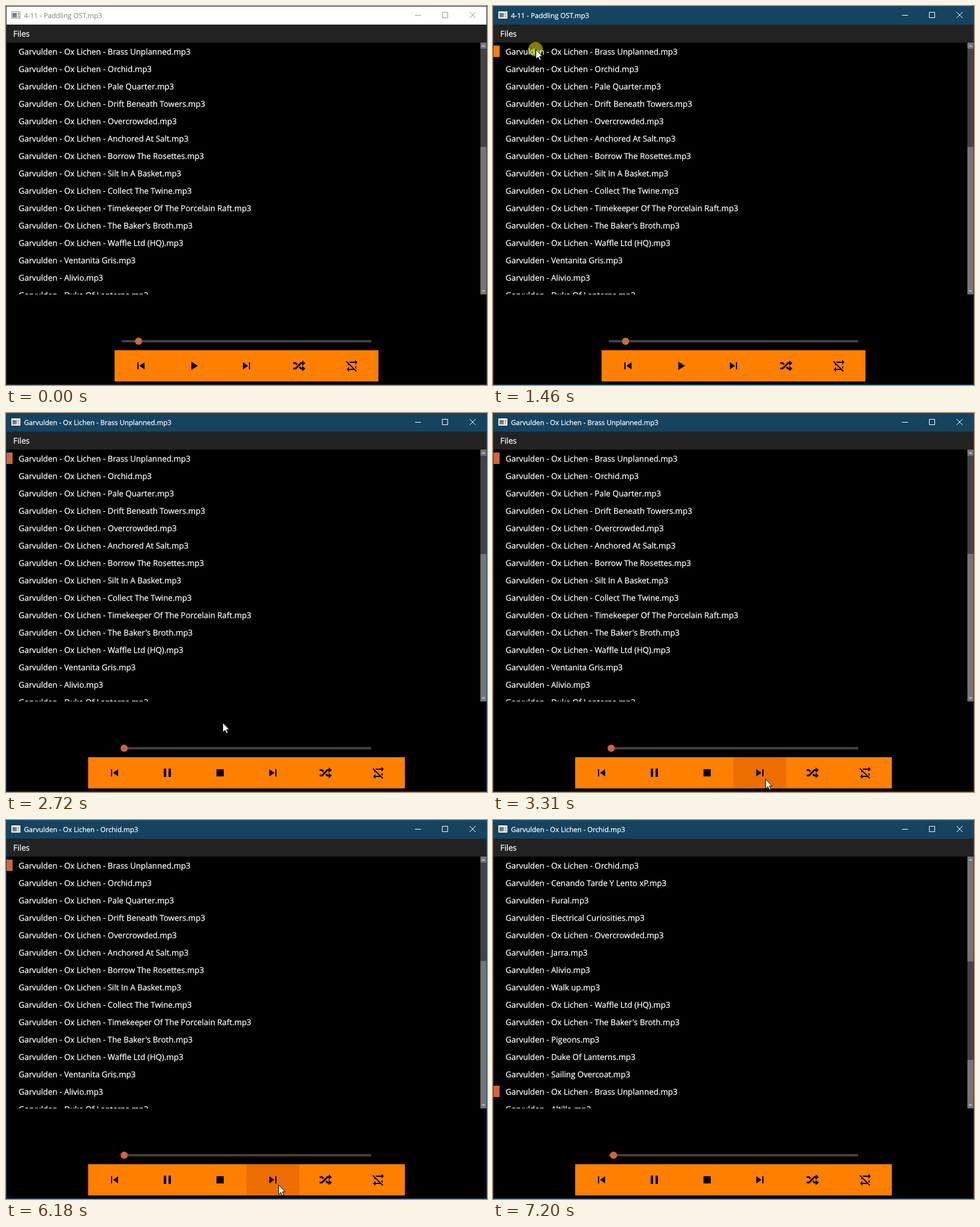
Animation, 802 px wide and 632 px high, one loop 8 s. Source, as an HTML page with a canvas:

```html
<!DOCTYPE html>
<html lang="en">
<head>
<meta charset="utf-8">
<title>Music player</title>
<style>
html, body { margin: 0; width: 100%; height: 100%; overflow: hidden; background: #000; }
canvas { display: block; }
</style>
</head>
<body>
<canvas id="stage" width="802" height="632"></canvas>
<script>
const ctx = document.getElementById('stage').getContext('2d');
const LOOP = 8000, STEP = 47;
const ORANGE = '#ff7f00', SALMON = '#d0653f';
const ARTIST = 'Garvulden - ', COVER = ARTIST + 'Ox Lichen - ';

const covers = ['Brass Unplanned', 'Orchid', 'Pale Quarter', 'Drift Beneath Towers', 'Overcrowded',
  'Anchored At Salt', 'Borrow The Rosettes', 'Silt In A Basket', 'Collect The Twine',
  'Timekeeper Of The Porcelain Raft', "The Baker's Broth", 'Waffle Ltd (HQ)'].map(s => COVER + s + '.mp3');
const own = ['Ventanita Gris', 'Alivio', 'Duke Of Lanterns', 'Cenando Tarde Y Lento xP', 'Fural',
  'Electrical Curiosities', 'Jarra', 'Walk up', 'Pigeons', 'Sailing Overcoat', 'Altillo'].map(s => ARTIST + s + '.mp3');
const sorted = [...covers, ...own.slice(0, 3)];
const shuffled = [covers[1], own[3], own[4], own[5], covers[4], own[6], own[1], own[7],
  covers[11], covers[10], own[8], own[2], own[9], covers[0], own[10]];

const icons = {
  previous: 'M6 6h2v12H6zM9.5 12l8.5 6V6z',
  play: 'M8 5v14l11-7z',
  pause: 'M6 5h4v14H6zM14 5h4v14h-4z',
  stop: 'M6 6h12v12H6z',
  next: 'M6 18l8.5-6L6 6zM16 6h2v12h-2z',
  shuffle: 'M17 3l5.25 4.5L17 12l5.25 4.5L17 21v-3h-2.74l-2.82-2.83 2.12-2.12L15.5 15H17V9h-1.5l-9 9H2v-3h3.26l9-9H17zM2 6h4.5l2.82 2.83-2.12 2.12L5.26 9H2z',
  repeat: 'M2 5.27L3.28 4 20 20.72 18.73 22l-3-3H7v3l-4-4 4-4v3h6.73L7 10.27V11H5V8.27zM17 13h2v4.18l-2-2zM17 5V2l4 4-4 4V7H8.82l-2-2z'
};
for (const name in icons) icons[name] = new Path2D(icons[name]);
const arrow = new Path2D('M.5 .5V16.5L4.3 13 6.8 18.5 9.2 17.5 6.8 12H11.5z');

const ease = {
  linear: u => u,
  in: u => u ** 1.5,
  out: u => 1 - (1 - u) ** 2,
  both: u => u * u * (3 - 2 * u)
};
// time, x, y, easing towards this point
const path = [
  [0, 494, 650], [200, 494, 632, 'linear'], [870, 22, 0, 'both'], [950, 34, 13, 'linear'],
  [1000, 42, 31, 'linear'], [1230, 71, 72, 'out'], [2170, 71, 72, 'linear'], [2720, 361, 516, 'in'],
  [2950, 465, 613, 'out'], [3110, 465, 613, 'linear'], [3310, 454, 610, 'both'], [4330, 454, 610, 'linear'],
  [4331, 454, 608, 'linear'], [6180, 454, 608, 'linear'], [6410, 532, 603, 'both'],
  [6870, 532, 603, 'linear'], [7190, 545, 640, 'in'], [LOOP, 545, 650, 'linear']
];
const clicks = [[1460, 1550], [1590, 1640], [3770, 3920], [6430, 6510]];

function cursorAt(t) {
  const i = path.findIndex(key => key[0] > t);
  const [t0, x0, y0] = path[i - 1], [t1, x1, y1, kind] = path[i];
  const elapsed = t - t0;
  const u = ease[kind]((elapsed - elapsed % STEP) / (t1 - t0));
  return { x: Math.round(x0 + (x1 - x0) * u), y: Math.round(y0 + (y1 - y0) * u) };
}

function rect(color, x, y, w, h) {
  ctx.fillStyle = color;
  ctx.fillRect(x, y, w, h);
}

function disc(color, x, y, r) {
  ctx.fillStyle = color;
  ctx.beginPath();
  ctx.arc(x, y, r, 0, 7);
  ctx.fill();
}

// A hairline outline gives the text a slightly firmer weight
function text(color, size, s, x, y) {
  ctx.font = size + 'px "Open Sans", "Noto Sans", sans-serif';
  ctx.fillStyle = ctx.strokeStyle = color;
  ctx.fillText(s, x, y);
  ctx.lineWidth = 0.25;
  ctx.strokeText(s, x, y);
  ctx.lineWidth = 1;
}

function lines(color, d) {
  ctx.strokeStyle = color;
  ctx.stroke(new Path2D(d));
}

function titleBar(active, title) {
  const ink = active ? '#fff' : '#999';
  rect(active ? '#154360' : '#fff', 1, 1, 800, 30);
  rect(active ? '#fff' : '#9a9a9a', 9, 9, 15, 12);
  rect('#e8e8e8', 10, 10, 13, 10);
  const shade = ctx.createLinearGradient(11, 11, 18, 19);
  shade.addColorStop(0, '#555');
  shade.addColorStop(1, '#999');
  rect(shade, 11, 12, 7, 7);
  rect('#999', 20, 12, 2, 3);
  rect('#aaa', 20, 16, 2, 3);
  text(ink, 11.44, title, 30, 20);
  lines(ink, 'M682 15.5h10M727.5 10.5h9v9h-9zM773 10l10 10M783 10l-10 10');
}

function list(songs, playing, hovered) {
  ctx.save();
  ctx.beginPath();
  ctx.rect(1, 61, 790, 420);
  ctx.clip();
  songs.forEach((song, i) => {
    const y = 66 + i * 29;
    if (i === hovered || i === playing) rect(i === hovered ? ORANGE : SALMON, 1, y, 10, 19);
    text('#fff', 13.35, song, 21, y + 15);
  });
  ctx.restore();
}

function scrollbar(thumbY) {
  rect('#757575', 791, 61, 10, 420);
  rect('#434343', 791, thumbY, 10, 164);
  ctx.fillStyle = '#b4b4b4';
  ctx.fill(new Path2D('M792.5 68h7L796 64.5zM792.5 474h7l-3.5 3.5z'));
}

function controls(names, pointer) {
  const left = 401 - names.length * 44;
  rect(ORANGE, left, 574, names.length * 88, 52);
  names.forEach((name, i) => {
    const x = left + i * 88;
    if (pointer.x >= x && pointer.x < x + 88 && pointer.y >= 574 && pointer.y < 626) rect('#ec6d00', x, 574, 88, 52);
    ctx.save();
    ctx.translate(x + 32, 588);
    ctx.fillStyle = '#000';
    ctx.fill(icons[name]);
    ctx.restore();
  });
}

function draw(t) {
  const cursor = cursorAt(t);
  const active = t >= 1460, started = t >= 1640, reordered = t >= 6890;
  // The interface hangs while the list is being shuffled
  const pointer = t >= 6180 && !reordered ? cursorAt(6180) : cursor;
  const hovered = pointer.y >= 61 && pointer.y < 481 ? Math.floor((pointer.y - 61) / 29) : -1;
  const title = t >= 3820 ? covers[1] : started ? covers[0] : '4-11 - Paddling OST.mp3';

  rect(active ? '#1b4a66' : '#3a3a3a', 0, 0, 802, 632);
  rect('#000', 1, 1, 800, 630);
  titleBar(active, title);
  rect('#222', 1, 31, 800, 30);
  text('#fff', 13.35, 'Files', 12, 51);
  list(reordered ? shuffled : sorted, !started ? -1 : reordered ? 13 : 0, hovered);
  scrollbar(reordered ? 236 : 71);

  rect('#404040', 193, 557, 416, 4);
  disc(t < 1920 ? '#c66f3c' : SALMON, t < 1920 ? 221 : reordered ? 201 : 197, 559, 6);
  controls(started ? ['previous', 'pause', 'stop', 'next', 'shuffle', 'repeat']
    : ['previous', 'play', 'next', 'shuffle', 'repeat'], pointer);

  if (clicks.some(([from, to]) => t >= from && t < to)) disc('rgba(255,255,0,.5)', cursor.x, cursor.y, 12);
  ctx.save();
  ctx.translate(cursor.x, cursor.y);
  ctx.fillStyle = '#fff';
  ctx.fill(arrow);
  ctx.strokeStyle = '#000';
  ctx.stroke(arrow);
  ctx.restore();
}

ctx.textRendering = 'geometricPrecision';
ctx.lineJoin = 'round';
const start = performance.now();
function tick() {
  draw((performance.now() - start) % LOOP);
  requestAnimationFrame(tick);
}
tick();
</script>
</body>
</html>
```
